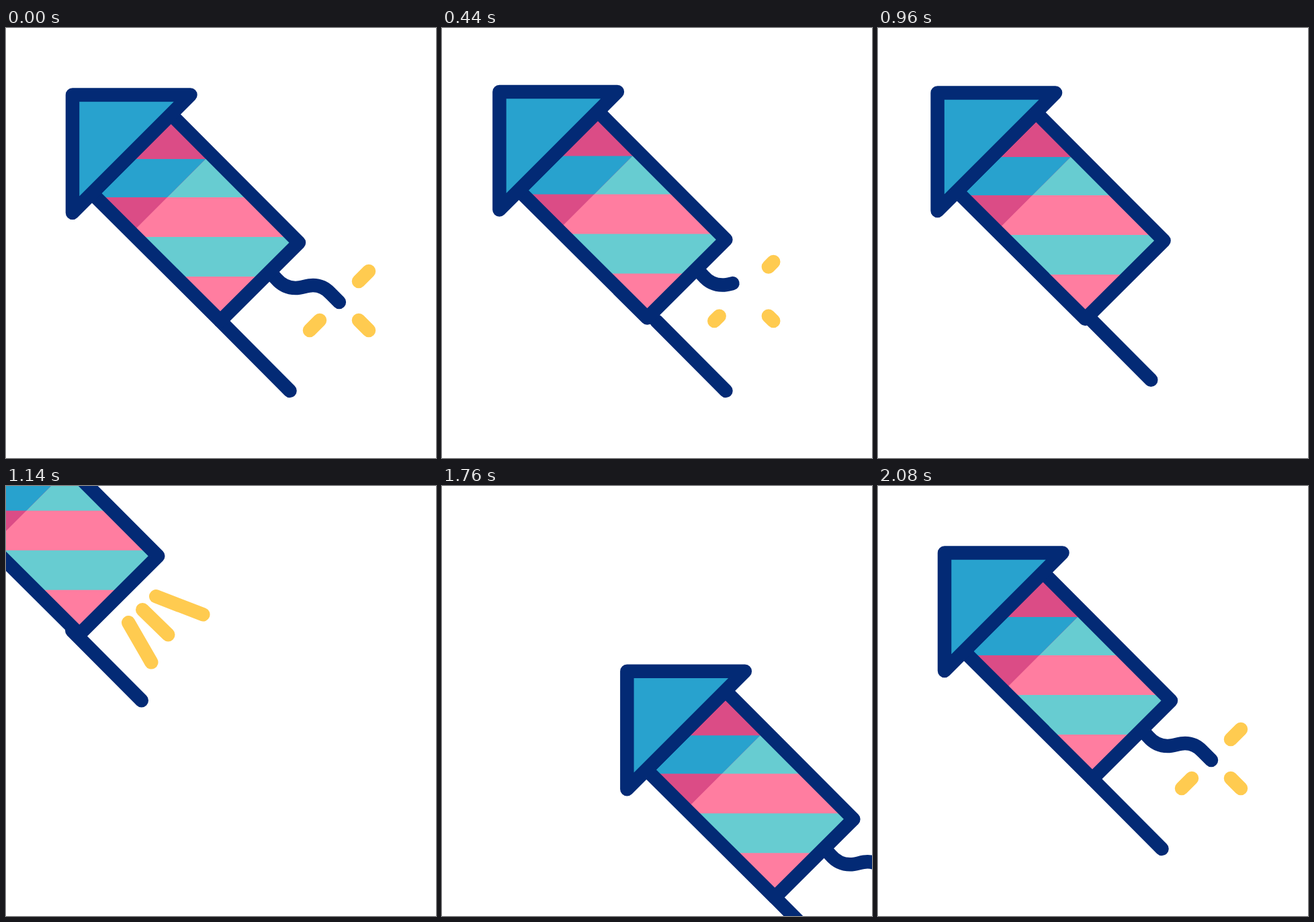
Write an HTML page that moves like this. It is 640x640 px and loops after 2.4 s.

```html
<!DOCTYPE html>
<html>
<head>
<meta charset="utf-8">
<style>
  html, body { margin: 0; width: 100%; height: 100%; overflow: hidden; background: #fff; }
  svg { display: block; width: 100%; height: 100%; }
  .ink { fill: none; stroke: #032a75; stroke-width: 20.5; stroke-linecap: round; stroke-linejoin: round; }
  .fire { fill: none; stroke: #ffcb50; stroke-width: 20.5; stroke-linecap: round; }
</style>
</head>
<body>
<svg viewBox="0 0 640 640">
  <defs>
    <clipPath id="body"><path d="M245.5 128.5 436 319.5 319 436 128 246Z"/></clipPath>
    <clipPath id="shade"><path d="M0 0H492L0 492Z"/></clipPath>
  </defs>
  <path id="sparks" class="fire"/>
  <path id="flames" class="fire"/>
  <path id="stick" class="ink" d="M319 436 422.5 540"/>
  <g id="rocket">
    <path id="fuse" class="ink" pathLength="100" d="M392 362 402 373Q414 387 431 387C441 387 447 383 457 383Q472 383 483 395L496 408"/>
    <g clip-path="url(#body)">
      <path fill="#ff7da0" d="M100 100H450V450H100Z"/>
      <path fill="#67ccd1" d="M100 195H450V252H100ZM100 311H450V370H100Z"/>
      <g clip-path="url(#shade)">
        <path fill="#db4c86" d="M100 100H450V311H100Z"/>
        <path fill="#28a2ce" d="M100 195H450V252H100Z"/>
      </g>
    </g>
    <path class="ink" d="M245.5 128.5 436 319.5 319 436 128 246Z"/>
    <path class="ink" style="fill:#28a2ce" d="M99 99.5H274.5L99 275Z"/>
  </g>
</svg>
<script>
const LOOP = 2400, IGNITE = 900, REENTER = 1400;
const [sparks, flames, stick, rocket, fuse] =
  ['sparks', 'flames', 'stick', 'rocket', 'fuse'].map(id => document.getElementById(id));

// Keys are [time, x, y]
const wobble = [[0, 0, 0], [440, -13.5, -4.5], [540, -20.5, 4], [720, -20, 26.5], [900, 4, 16], [1140, 11, 5.5]];
const burn = [[0, 496, 406], [200, 494, 405.5], [440, 463, 396.5], [720, 423, 380.5], [790, 413, 376.5]];
const flameLines = [[444, 385, 514, 412], [424, 405, 462, 442], [403, 424, 437, 483]];
const sparkDirs = [[1, -1], [-1, 1], [1, 1]];

const clamp = v => Math.max(0, Math.min(1, v));
const mix = (a, b, p) => a + (b - a) * p;

function along(keys, t) {
  const i = keys.findIndex(k => k[0] > t);
  if (i < 0) return keys[keys.length - 1].slice(1);
  const [a, b] = [keys[i - 1], keys[i]], p = (t - a[0]) / (b[0] - a[0]);
  return [mix(a[1], b[1], p), mix(a[2], b[2], p)];
}

// Diagonal flight: accelerate away, then glide back in
function flight(t) {
  if (t < IGNITE) return 0;
  if (t < REENTER) return -219 * ((t - IGNITE) / 240) ** 1.9;
  return 540 * (Math.max(0, 2030 - t) / 530) ** 1.65;
}

// Visible part of each spark, as [from, to]
function sparkTrim(t) {
  if (t < 90) return [0, 1];
  if (t < 790) {
    const p = (t - 90) % 280 / 140;
    return p < 1 ? [p, 1] : [0, p - 1];
  }
  return [0, clamp((t - 1940) / 140)];
}

function draw(t) {
  const back = t >= REENTER, d = flight(t);
  const [wx, wy] = back ? [0, 0] : along(wobble, t);
  const x = d + wx, y = d + wy;
  stick.setAttribute('transform', `translate(${d} ${d})`);
  rocket.setAttribute('transform', `translate(${x} ${y})`);

  const left = back ? 100 : 100 * (1 - t / 915);
  fuse.style.display = left > 0 ? '' : 'none';
  fuse.setAttribute('stroke-dasharray', back ? 'none' : `${Math.max(0, left)} 200`);

  const [from, to] = sparkTrim(t), [cx, cy] = along(burn, back ? 0 : t);
  const r1 = 29 + 15 * from, r2 = 29 + 15 * to;
  sparks.setAttribute('d', to > from ? sparkDirs.map(([u, v]) =>
    `M${cx + x + u * r1} ${cy + y + v * r1}L${cx + x + u * r2} ${cy + y + v * r2}`).join('') : '');

  const grow = back ? 0 : clamp((t - 1000) / 120);
  flames.setAttribute('d', grow ? flameLines.map(([x1, y1, x2, y2]) =>
    `M${x1 + d} ${y1 + d}L${mix(x1, x2, grow) + d} ${mix(y1, y2, grow) + d}`).join('') : '');
}

const start = performance.now();
function tick() {
  draw((performance.now() - start) % LOOP);
  requestAnimationFrame(tick);
}
tick();
</script>
</body>
</html>
```
